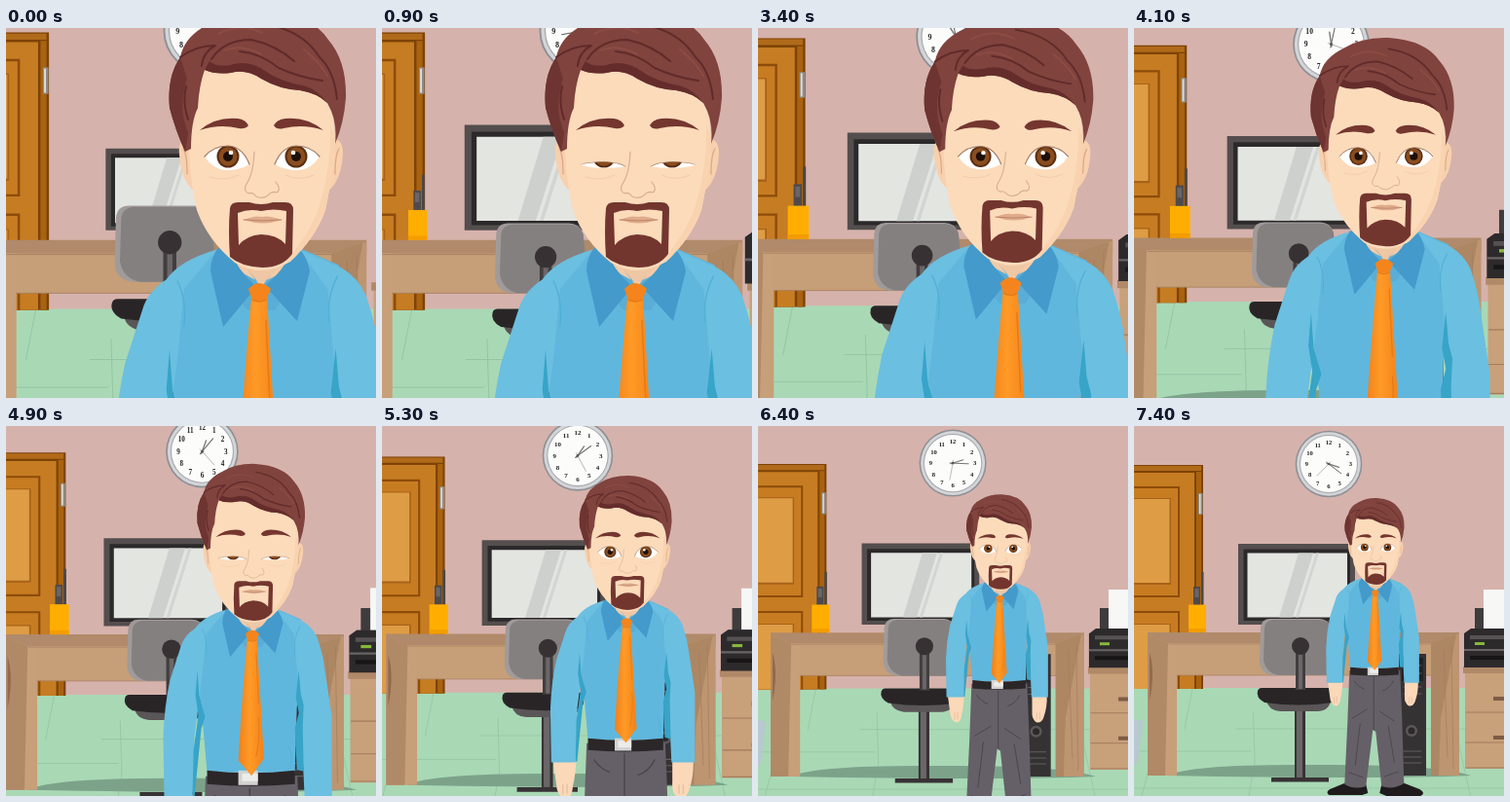
These frames come from a looping animation (380x380 px, 7.5 s). An HTML page:

```html
<!DOCTYPE html>
<html lang="en">
<head>
<meta charset="utf-8">
<title>Office zoom out</title>
<style>
html, body { margin: 0; width: 100%; height: 100%; overflow: hidden; background: #d6b2ac; }
svg { display: block; width: 100vw; height: 100vh; }
#numbers text { font: bold 6.6px "Liberation Serif", "Noto Serif", serif; text-anchor: middle; fill: #222; }
.line { fill: none; stroke-linecap: round; stroke-linejoin: round; }
</style>
</head>
<body>
<svg viewBox="0 0 380 380">
  <defs>
    <clipPath id="lens">
      <path id="lid" d="M204 132Q213 121 228 121Q243 122 250 140Q240 146 226 146Q212 145 204 132Z"/>
    </clipPath>
    <g id="eye">
      <g clip-path="url(#lens)">
        <path d="M200 115H254V150H200Z" fill="#fff"/>
        <circle cx="228" cy="132" r="11.500" fill="#5a2d12"/>
        <circle cx="228" cy="132" r="9.500" fill="#8a4d1e"/>
        <circle cx="228" cy="132" r="5" fill="#1d0f0a"/>
        <circle cx="231" cy="128" r="2.300" fill="#fff"/>
      </g>
      <path class="line lash" d="M204 132Q213 121 228 121Q243 122 250 140" stroke="#a0765c" stroke-width="1.200"/>
    </g>
    <linearGradient id="tie">
      <stop offset="0" stop-color="#f0801c"/><stop offset=".45" stop-color="#ff9a26"/><stop offset="1" stop-color="#f2821a"/>
    </linearGradient>
  </defs>

  <g id="room">
    <path d="M-20-20H400V270H-20Z" fill="#d6b2ac"/>
    <path d="M-20 269H400V400H-20Z" fill="#a9d8b5"/>
    <path class="line" stroke="#94c6a3" stroke-width=".8" d="M122.500 294L124 345M105 311H400M0 334H120M60 270L52 311M330 311L350 400M20 334L8 380M124 345L118 380M0 372H380"/>

    <g id="door">
      <path d="M-20 40H71V270H-20Z" fill="#7d4306"/>
      <path d="M-20 41H69V46H-20Z" fill="#b06a1a"/>
      <path d="M64 47H69V270H64Z" fill="#a9620f"/>
      <path d="M-20 48H62V270H-20Z" fill="#c67c22"/>
      <path d="M-20 62H47V176H-20ZM-20 190H47V270H-20Z" fill="#8d4c08"/>
      <path d="M-20 64H45V174H-20ZM-20 192H45V270H-20Z" fill="#c87c22"/>
      <path d="M-20 74H38V163H-20ZM-20 203H38V270H-20Z" fill="#a8621a"/>
      <path d="M-20 75H36.500V161H-20ZM-20 204H36.500V270H-20Z" fill="#de9c45"/>
      <path d="M66 69H70.500V91H66Z" fill="#8f8c8a"/>
      <path d="M67 70H68.500V90H67Z" fill="#e0dfdd"/>
    </g>

    <g transform="translate(200 39)">
      <circle r="34.300" fill="#8d9094"/>
      <circle r="32.800" fill="#d3d5d8"/>
      <circle r="30" fill="#a5a8ab"/>
      <circle r="29" fill="#fcfcfb"/>
      <g id="numbers"></g>
      <path id="hour" class="line" d="M0 2V-11" stroke="#777" stroke-width="1.200"/>
      <path id="minute" class="line" d="M0 3V-16" stroke="#666" stroke-width=".9"/>
      <path id="second" class="line" d="M0 3V-17" stroke="#999" stroke-width=".6"/>
      <circle r="1.300" fill="#555"/>
    </g>

    <path d="M-5 300L9 303L4 346L-5 352Z" fill="#b7c8cf"/>
    <path d="M34 359Q60 347 185 348Q310 347 346 359Q250 363 34 359Z" fill="#7ca38a"/>

    <g id="monitor">
      <path d="M107 121H227V204H107Z" fill="#544e4e"/>
      <path d="M112.500 126.500H222V200H112.500Z" fill="#2c292a"/>
      <path d="M116.500 130.500H219V196.500H116.500Z" fill="#e3e5e1"/>
      <path d="M169 130.500H184L163 196.500H149Z" fill="#cdd0cc"/>
      <path d="M187 130.500H190L169 196.500H166Z" fill="#d3d5d2"/>
    </g>

    <g id="desk">
      <path d="M14 212H334V224H14Z" fill="#b08a6a"/>
      <path d="M35 223H312V256H35Z" fill="#c69e77"/>
      <path d="M14 214L35 223H44V359H14Z" fill="#c79f79"/>
      <path d="M14 214L35 223L32 359H14Z" fill="#b08967"/>
      <path d="M16 233Q22 252 16 282Z" fill="#93694d"/>
      <path d="M305 223L331 214H334V359H305Z" fill="#bd9570"/>
      <path d="M305 223L331 214L315 300L313 359H305Z" fill="#ad8663"/>
      <path class="line" stroke="#a47e5f" stroke-width=".7" d="M36 224H305M44 256H305M318 230L322 340M326 224L328 352"/>
    </g>

    <g id="phone">
      <path d="M69 150H71.500V190H69Z" fill="#4a4748"/>
      <path d="M61 165H68V190H61Z" fill="#4e4a4b"/>
      <path d="M62.500 167H66.500V176H62.500Z" fill="#6a6667"/>
      <path d="M56 183.500H74V212H56Z" fill="#ffae00"/>
      <path d="M56 208H74V212H56Z" fill="#f39d00"/>
    </g>

    <g id="tower">
      <path d="M272 234H300V359H272Z" fill="#353234"/>
      <path d="M275 238H297V262H275Z" fill="#242223"/>
      <path class="line" stroke="#625e60" stroke-width="1" d="M277 246H295M277 254H295M277 268H295M277 275H295M277 334H295M277 340H295M277 346H295"/>
      <circle cx="285" cy="313" r="6" fill="#5b5759"/>
      <circle cx="285" cy="313" r="3.500" fill="#2c292a"/>
    </g>

    <g id="cabinet">
      <path d="M340 248H410V352H340Z" fill="#c8a07a"/>
      <path d="M338 247H410V254H338Z" fill="#b08a68"/>
      <path class="line" stroke="#a37c5b" stroke-width="1" d="M341 294H410M341 325H410M341 351H410"/>
      <path d="M369 278H390V282H369ZM369 318H390V322H369Z" fill="#7d5c45"/>
    </g>

    <g id="printer">
      <path d="M350 187H398V212H350Z" fill="#3f3c3e"/>
      <path d="M359 168H388V212H359Z" fill="#f7f7f6"/>
      <path d="M346 208H402V224H346Z" fill="#4a4749"/>
      <path d="M339 213L346 208H402V248H339Z" fill="#2d2a2c"/>
      <path d="M345 215H402V219H345Z" fill="#565254"/>
      <path d="M350 222H360V225H350Z" fill="#86b83c"/>
      <path d="M339 229H402V231H339Z" fill="#686466"/>
      <path d="M345 236H402V240H345Z" fill="#171516"/>
    </g>

    <g id="chair">
      <path d="M141 361H200V365.500H141Z" fill="#373234"/>
      <path d="M165 288H176V362H165Z" fill="#373234"/>
      <path d="M167 290H173V361H167Z" fill="#6b6667"/>
      <path d="M136 282H202Q200 293 188 293H150Q138 292 136 282Z" fill="#5a5556"/>
      <path d="M131 269H204Q208 276 204 284Q170 289 134 284Q125 279 127 272Q128 269 131 269Z" fill="#292527"/>
      <path d="M140 198H190Q199 198 202 207L206 242Q207 256 195 256H143Q130 255 129 242L130 207Q131 198 140 198Z" fill="#a09b9a"/>
      <path d="M143 199H190Q199 199 202 207L206 242Q207 256 195 256H148Q135 253 133 240L134 207Q135 200 143 199Z" fill="#858080"/>
      <path d="M166 226H176V271H166Z" fill="#423d3f"/>
      <path d="M169 228H173V270H169Z" fill="#6b6667"/>
      <circle cx="171" cy="226" r="9" fill="#373133"/>
    </g>
  </g>

  <g id="man">
    <g transform="translate(262 132) scale(2.97) translate(-249 -124.500)">
      <path d="M219 366L239 368L241 377L235 379H201Q197 376 202 373ZM276 366L255 368L253 377L260 380H295Q301 377 294 373Z" fill="#1f1b1d"/>
      <path d="M222 251H274L276 300L278 367Q267 374 255 370L249 314L246 312L239 370Q227 374 217 368L220 305Z" fill="#656067"/>
      <path class="line" stroke="#4b464d" stroke-width=".9" d="M247 258V312M227 262Q231 268 237 270M267 262Q263 270 256 272M225 300L240 291M253 293L268 303M222 356L236 361M258 360L272 355M233 306L228 348M262 308L268 345"/>
    </g>
    <g transform="translate(262 132) scale(1.641) translate(-254.300 -132)">
      <path d="M165 380H193Q192 400 189 412Q188 427 180 427Q170 425 169 410ZM308 380H333Q334 400 328 417Q325 428 316 427Q307 422 308 408Z" fill="#fbd8b8"/>
      <path class="line" stroke="#d7a888" stroke-width=".8" d="M177 411V422M182 410V421M316 411V421M321 411V421"/>
      <path d="M223 192L200 205L192 240L201 290L207 357H297L299 290L312 225L303 200L280 190Z" fill="#60b7dd"/>
      <path d="M227 190Q203 197 195 209Q183 217 180 228L169 262Q163 290 162 320L163 384H192L194 320L202 258L206 215Z" fill="#6bbfe0"/>
      <path d="M278 190L305 202Q315 208 320 219Q326 236 328 253L335 300V384H307L304 320L300 260L296 215Z" fill="#6bbfe0"/>
      <path d="M197 253L195 278L198 298L193 335L192 383H194L201 312L205 300L199 280Z" fill="#37a4c8"/>
      <path d="M301 252L298 280L301 296L297 312L299 354L306 356L305 310L306 288L303 276Z" fill="#37a4c8"/>
      <path class="line" stroke="#4fb0d6" stroke-width=".8" d="M291 330Q296 344 291 354M202 210Q208 222 206 238M302 207Q295 220 297 236"/>
      <path d="M207 355Q250 360 297 355V369Q250 373 207 369Z" fill="#2b2628"/>
      <path d="M239 355H259V370H239Z" fill="#d3d3d2"/>
      <path d="M243 358H259V366H243Z" fill="#ececeb"/>
    </g>

    <path d="M228 210H296L297 250L262 276L227 250Z" fill="#f0c7a4"/>
    <path d="M217 227L232 231L262 264L290 237L300 226L306 240L276 290H248L213 245Z" fill="#5aadd6"/>
    <path d="M232 228L262 266L292 230L286 250L262 262L240 250Z" fill="#f4cba8"/>
    <path d="M218 226Q210 236 210 250L223 307L257 266Q238 248 230 230Z" fill="#449aca"/>
    <path d="M300 225Q310 236 312 250L299 301L266 265Q286 248 293 230Z" fill="#449aca"/>

    <path d="M252 276H268L280 478L259 507L237 481Q241 400 252 276Z" fill="url(#tie)"/>
    <path d="M249 268Q260 256 272 268L267 280H253Z" fill="#f5841c"/>
    <path class="line" stroke="#e47a18" stroke-width="1.500" d="M253 279Q261 283 267 279M267 300L271 385M271 410Q274 440 267 474"/>

    <path d="M188 113Q176 114 178 130Q180 158 194 168ZM334 113Q347 114 346 130Q344 158 330 168Z" fill="#f8d0ad"/>
    <path class="line" stroke="#d9a988" stroke-width="1.300" d="M182 124Q186 129 186 150M342 124Q338 130 338 150"/>
    <path d="M195 30Q187 105 188 125Q190 164 196 187Q207 218 235 241Q262 257 290 241Q318 216 328 187Q337 145 338 112L333 55L260 20Z" fill="#fcdbbb"/>
    <path d="M328 187Q337 145 338 112L333 100Q334 150 319 190Q309 215 291 235V241Q318 216 328 187Z" fill="#f9d3b0"/>

    <path d="M184 127Q174 105 168 82Q165 50 179 30Q183 8 210-5Q232-19 266-18Q313-15 331 12Q350 34 349 72Q347 98 338 119Q341 96 330 77Q320 67 302 64Q281 63 262 52Q247 42 231 46Q214 48 204 43Q198 60 197 82Q190 96 190 124Z" fill="#80433d"/>
    <path d="M204 43Q216 48 231 46Q247 42 262 52Q281 63 302 64Q320 67 330 77Q320 63 305 59Q281 55 266 44Q249 32 230 38Q215 40 209 34Z" fill="#642d2c"/>
    <path d="M168 82Q165 50 179 30L186 52Q176 80 187 108L184 127Q174 105 168 82Z" fill="#6d3431"/>
    <path class="line" stroke="#602b2a" stroke-width="2" d="M179 30Q195 18 215 18Q202 25 201 39M211 32Q224 12 252 12Q278 18 296 34M240 24Q262 26 280 41Q302 51 325 54M266-4Q304 2 322 30Q337 44 340 73M185 60Q181 76 187 94"/>
    <path class="line" stroke="#8c4c44" stroke-width="2" d="M224 23Q242 16 262 27M218 6Q240-6 263 5M306 22Q322 35 330 49"/>

    <g fill="#74362f">
      <path d="M199 105Q215 91 238 93Q246 94 249 100Q246 104 239 103Q219 98 199 105Z"/>
      <path d="M326 105Q309 91 287 93Q278 94 275 100Q278 105 285 103Q306 98 326 105Z"/>
    </g>
    <use href="#eye"/>
    <use href="#eye" transform="translate(526 0) scale(-1 1)"/>

    <path class="line" stroke="#d8af92" stroke-width="1.200" d="M255 127Q254 150 247 160Q243 167 249 170Q253 168 257 173Q264 176 269 172Q273 167 278 169Q283 166 277 158"/>
    <path class="line" stroke="#f0cbab" stroke-width="1" d="M209 153Q225 158 239 151M287 151Q302 158 316 151"/>
    <path d="M230 185Q231 179 238 179H250Q262 183 274 179H287Q295 179 295 187L294 232Q284 246 263 246Q241 245 230 235Q228 208 230 185ZM238 190L239 223Q247 213 262 212Q278 212 287 222L288 188Q275 185 262 188Q249 185 238 190Z" fill="#73362f" fill-rule="evenodd"/>
    <path d="M244 197Q256 192 262 194Q270 192 283 197Q264 204 244 197Z" fill="#dfab8b"/>
    <path class="line" stroke="#b98468" stroke-width="1" d="M244 197Q263 199 283 197"/>
  </g>
</svg>
<script>
const LOOP = 7500, STEP = 100;
const BLINKS = [900, 4900, 5900];
const get = id => document.getElementById(id);
const set = (node, value) => node.setAttribute("transform", value);
const clamp = v => Math.max(0, Math.min(1, v));
const glide = (t, from, to) => (1 - Math.cos(Math.PI * clamp((t - from) / (to - from)))) / 2;
const scaleAt = (x, y, sx, sy = sx) => `translate(${x} ${y}) scale(${sx} ${sy}) translate(${-x} ${-y})`;

// id, foot x, foot y, start time
const pops = [
  ["chair", 170, 363, -850],
  ["monitor", 167, 204, -425],
  ["printer", 370, 248, 0],
  ["phone", 65, 212, 425]
];

function backOut(u) {
  const v = clamp(u) - 1;
  return 1 + 2.7 * v ** 3 + 1.7 * v ** 2;
}

for (let n = 1; n <= 12; n++) {
  const a = n * Math.PI / 6;
  const label = document.createElementNS("http://www.w3.org/2000/svg", "text");
  label.setAttribute("x", 22.5 * Math.sin(a));
  label.setAttribute("y", 2.2 - 22.5 * Math.cos(a));
  label.textContent = n;
  get("numbers").append(label);
}

function draw(t) {
  set(get("room"), scaleAt(183, 188, 1.24 ** (1 - glide(t, 2200, 6900))));

  const p = glide(t, 2830, 7230);
  const size = 2.97 ** (1 - p);
  const x = 241.3 + 6.97 * size, y = 132 - 7.5 * p ** 2;
  set(get("man"), `translate(${x} ${y}) scale(${size / 2.97}) translate(-262 -132)`);

  for (const [id, px, py, start] of pops) {
    const u = (t - start) / 1700;
    set(get(id), scaleAt(px, py, Math.max(0, backOut(u))));
  }

  const turn = 35 * (t - 4900) / 1000;
  set(get("hour"), `rotate(${turn + 20})`);
  set(get("minute"), `rotate(${turn + 40})`);
  set(get("second"), `rotate(${turn + 138})`);

  const gap = Math.min(...BLINKS.map(b => Math.abs(t - b)));
  const blink = scaleAt(228, 143, 1, Math.max(0.25, Math.min(1, gap / 200)));
  set(get("lid"), blink);
  set(document.querySelector(".lash"), blink);
}

const begin = performance.now();
function tick() {
  const t = (performance.now() - begin) % LOOP;
  draw(Math.floor(t / STEP) * STEP);
  requestAnimationFrame(tick);
}
tick();
</script>
</body>
</html>
```
